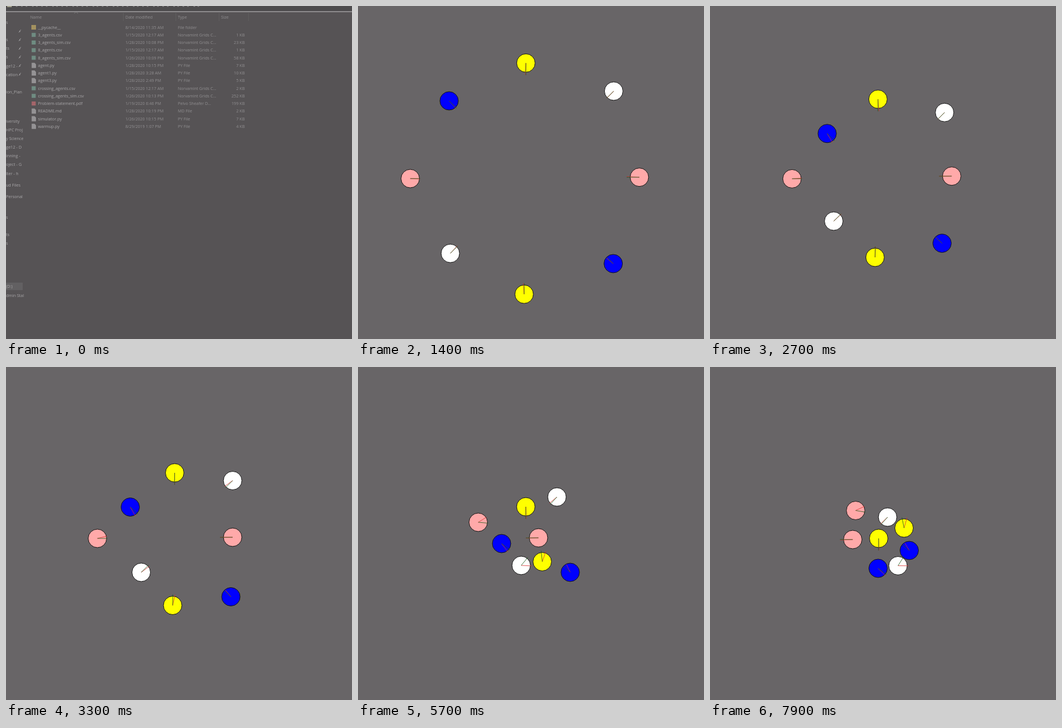
An HTML page for the animation above (8 s loop, 600x579 px).

```html
<!DOCTYPE html>
<html lang="en">
<head>
<meta charset="utf-8">
<title>Crossing agents</title>
<style>
  html, body { margin: 0; width: 100%; height: 100%; overflow: hidden; background: #686567; }
  svg { display: block; width: 100%; height: 100%; }
  text { font: 7.1px "Open Sans", "Noto Sans", sans-serif; fill: #a9a7a9; white-space: pre; }
  .dim { fill: #918f91; }
</style>
</head>
<body>
<svg id="stage" viewBox="0 0 600 579">
  <g id="files"><rect width="600" height="579" fill="#565355"/></g>
  <g id="agents"></g>
</svg>
<script>
const LOOP = 8000, STEP = 100, RADIUS = 16;
const files = document.getElementById('files');
const agentLayer = document.getElementById('agents');

function add(parent, tag, attrs, text) {
  const node = document.createElementNS('http://www.w3.org/2000/svg', tag);
  for (const key in attrs) node.setAttribute(key, attrs[key]);
  if (text) node.textContent = text;
  parent.append(node);
  return node;
}

// File list
const label = (x, y, text, extra) => add(files, 'text', { x, y: y + 2.5, ...extra }, text);
const box = (x, y, width, height, fill) => add(files, 'rect', { x, y, width, height, fill });

const CSV = 'Norvamint Grids C...', PY = 'PY File';
const rows = [
  ['__pycache__', '8/14/2020 11:35 AM', 'File folder', ''],
  ['3_agents.csv', '1/15/2020 12:17 AM', CSV, '1 KB'],
  ['3_agents_sim.csv', '1/28/2020 10:08 PM', CSV, '23 KB'],
  ['8_agents.csv', '1/15/2020 12:17 AM', CSV, '1 KB'],
  ['8_agents_sim.csv', '1/26/2020 10:09 PM', CSV, '58 KB'],
  ['agent.py', '1/28/2020 10:15 PM', PY, '7 KB'],
  ['agent1.py', '1/28/2020 3:28 AM', PY, '10 KB'],
  ['agent3.py', '1/28/2020 2:49 PM', PY, '5 KB'],
  ['crossing_agents.csv', '1/15/2020 12:17 AM', CSV, '2 KB'],
  ['crossing_agents_sim.csv', '1/26/2020 10:13 PM', CSV, '252 KB'],
  ['Problem-statement.pdf', '1/19/2020 6:46 PM', 'Pelvo Sheafer D...', '199 KB'],
  ['README.md', '1/28/2020 10:19 PM', 'MD File', '2 KB'],
  ['simulator.py', '1/26/2020 10:15 PM', PY, '7 KB'],
  ['warmup.py', '8/29/2019 1:07 PM', PY, '4 KB']
];

function fileIcon(name, y) {
  if (name.endsWith('__')) {
    box(44, y - 4, 8, 8, '#a3915f');
  } else if (name.endsWith('.csv')) {
    box(44.5, y - 3.5, 7, 7, '#6f8c82');
  } else if (name.endsWith('.pdf')) {
    box(44.5, y - 3.5, 7, 7, '#a5656a');
  } else {
    add(files, 'path', { d: `M44.5 ${y - 4.5}h5l2.5 2.5v6.5h-7.5z`, fill: '#959395' });
  }
}

function buildFiles() {
  box(0, 0, 600, 9, '#4e4c4e');
  box(2, 0, 8, 2, '#a5a38f');
  for (let x = 17; x < 340; x += 7 + x % 5) box(x, 0, 3, 1.2, '#858385');
  box(0, 9, 600, 1.6, '#9a989a');
  add(files, 'path', { d: 'M118 13l3.5-2.5 3.5 2.5', fill: 'none', stroke: '#858385', 'stroke-width': .7 });
  [[42, 'Name'], [207, 'Date modified'], [298, 'Type'], [373, 'Size']]
    .forEach(([x, text]) => label(x, 19, text, { class: 'dim' }));
  [203, 294, 369, 420].forEach(x => box(x, 12, .7, 14, '#646264'));

  rows.forEach(([name, date, type, size], i) => {
    const y = 37 + i * 13.25;
    fileIcon(name, y);
    label(55.5, y, name);
    label(207, y, date, { class: 'dim' });
    label(298, y, type, { class: 'dim' });
    label(414, y, size, { class: 'dim', 'text-anchor': 'end' });
  });

  box(0, 481, 29, 13, '#626062');
  const side = [
    [28, 's'], [58, 's'], [73, 'ts'], [88, 's'], [104, 'ge12 -'], [119, 'cation'],
    [149, 'ion_Plan'], [200, 'iversity'], [215, 'HPC Proj'], [230, 'y Science'],
    [245, 'ge12 - D'], [260, 'inning -'], [275, 'oject - G'], [291, 'lter - h'],
    [311, 'ud Files'], [331, 'Personal'], [367, 's'], [397, 'ts'], [412, 's'],
    [487, '(D:)'], [503, 'dmin Stal']
  ];
  side.forEach(([y, text]) => label(0, y, text));
  [44, 59, 74, 89, 104, 119].forEach(y =>
    add(files, 'path', { d: `M22 ${y + 2}l2-2m-1-1l2 2m-1-2l2-1.5`, stroke: '#a09ea0', 'stroke-width': 1, fill: 'none' }));
}

// Agents: path points belong to the times in KEYS, goals lie opposite the start
const KEYS = [.1, .7, 2.1, 3.3, 4.5, 5.7, 7.9];
const PINK = '#ffa9a9', YELLOW = '#ffff00', BLUE = '#0000ff', WHITE = '#ffffff';
const agents = [
  { fill: PINK, reach: 17, goal: [541, 299], path: [[41, 299], [63.5, 299], [123.5, 301], [158.5, 298], [190, 285], [208.5, 270], [252.5, 249.5]] },
  { fill: PINK, reach: 22, goal: [41, 299], path: [[541, 299], [518.5, 299], [447.5, 296], [393, 296], [349.5, 296.5], [313, 297], [247.5, 300]] },
  { fill: YELLOW, reach: 21, goal: [290, 550], path: [[291, 50], [292, 70], [290, 137.5], [292.5, 184], [290, 220.5], [291, 243], [292.5, 298]] },
  { fill: YELLOW, reach: 19, goal: [291, 50], path: [[290, 550], [290, 531], [286, 461.5], [289, 414.5], [306, 371], [319.5, 338.5], [336.5, 280]] },
  { fill: BLUE, reach: 18, goal: [468, 477], path: [[114, 123], [133.5, 140], [187.5, 198.5], [215.5, 243.5], [235, 281.5], [249, 307], [291.5, 350]] },
  { fill: BLUE, reach: 15, goal: [114, 123], path: [[468, 477], [460.5, 464.5], [417.5, 426.5], [390, 399.5], [374.5, 375], [368, 357], [345.5, 319]] },
  { fill: WHITE, reach: 17, goal: [114, 477], path: [[468, 122], [459.5, 131.5], [421, 170.5], [393, 197.5], [364, 212.5], [345, 226], [308, 261]] },
  { fill: WHITE, reach: 18, goal: [468, 122], path: [[114, 477], [135, 457], [192, 396], [234.5, 357], [262.5, 343.5], [283, 345], [326, 345.5]] }
];

// The simulation runs slowly at first, then catches up
const PACE = [[0, 0], [.7, .7], [.9, .845], [1.8, 1.7], [2.1, 2.1], [8, 8]];
function simTime(t) {
  const i = Math.max(1, PACE.findIndex(p => t <= p[0]));
  const [a, b] = [PACE[i - 1], PACE[i]];
  return a[1] + (b[1] - a[1]) * (t - a[0]) / (b[0] - a[0]);
}

function position(path, time) {
  const last = KEYS.length - 1;
  const t = Math.min(KEYS[last], Math.max(KEYS[0], time));
  const i = Math.min(last - 1, Math.max(0, KEYS.findIndex(k => t < k) === -1 ? last - 1 : KEYS.findIndex(k => t < k) - 1));
  const span = KEYS[i + 1] - KEYS[i], s = (t - KEYS[i]) / span;
  return [0, 1].map(axis => {
    const chord = j => (path[j + 1][axis] - path[j][axis]) / (KEYS[j + 1] - KEYS[j]);
    const slope = j => j === 0 ? chord(0) : j === last ? chord(last - 1) : (chord(j - 1) + chord(j)) / 2;
    const a = path[i][axis], b = path[i + 1][axis];
    return a + (b - a) * s * s * (3 - 2 * s)
      + span * s * (1 - s) * (slope(i) * (1 - s) - slope(i + 1) * s);
  });
}

function buildAgents() {
  for (const agent of agents) {
    agent.node = add(agentLayer, 'g');
    add(agent.node, 'circle', { r: RADIUS, fill: agent.fill, stroke: '#151515', 'stroke-width': 1 });
    const ray = stroke => add(agent.node, 'line', { stroke, 'stroke-width': .8 });
    agent.motion = ray('#d83030');
    agent.aim = ray('#1c5a1c');
  }
}

function point(line, dx, dy, length) {
  const scale = length / (Math.hypot(dx, dy) || 1);
  line.setAttribute('x2', dx * scale);
  line.setAttribute('y2', dy * scale);
}

function render(ms) {
  const listing = ms < 100;
  files.style.display = listing ? '' : 'none';
  agentLayer.style.display = listing ? 'none' : '';
  const t = simTime(ms / 1000);
  for (const { path, goal, reach, node, motion, aim } of agents) {
    const [x, y] = position(path, t);
    const before = position(path, t - .05), after = position(path, t + .05);
    node.setAttribute('transform', `translate(${x} ${y})`);
    point(aim, goal[0] - x, goal[1] - y, reach);
    point(motion, after[0] - before[0], after[1] - before[1], reach);
  }
}

buildFiles();
buildAgents();
const start = performance.now();
function tick() {
  const elapsed = (performance.now() - start) % LOOP;
  render(Math.floor(elapsed / STEP) * STEP);
  requestAnimationFrame(tick);
}
tick();
</script>
</body>
</html>
```
